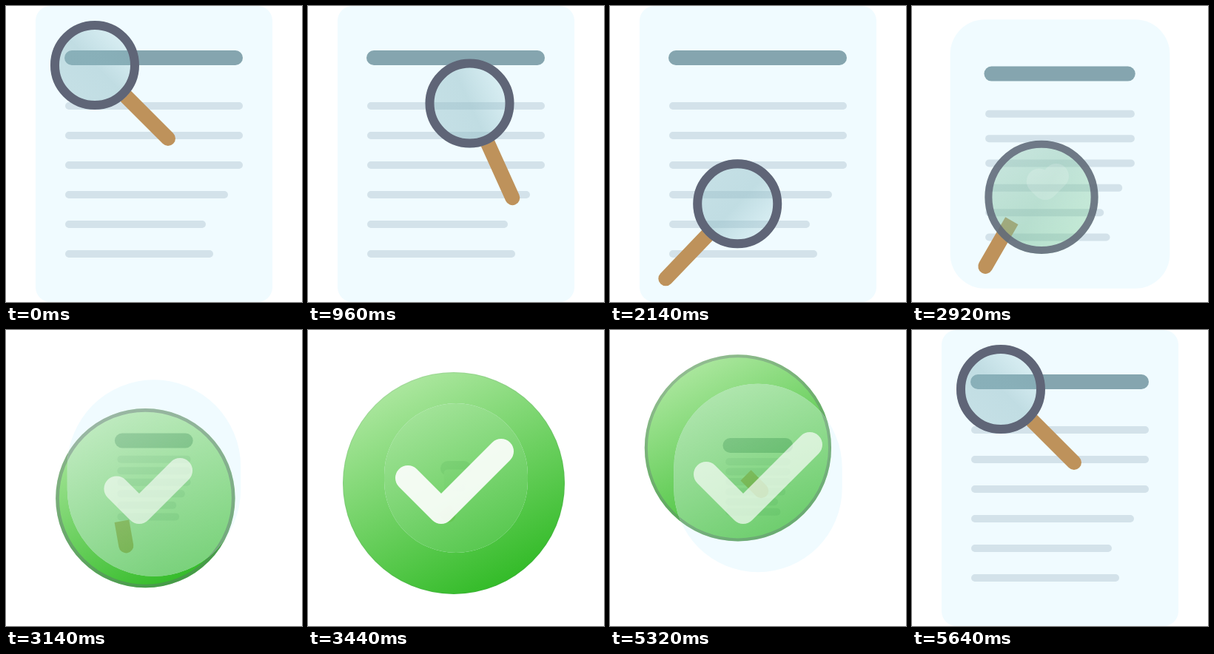
These frames come from a looping animation (400x400 px, 5740 ms). An HTML page with a canvas:

```html
<!DOCTYPE html>
<html lang="en">
<head>
<meta charset="utf-8">
<title>Document check</title>
<style>
  html, body { margin: 0; width: 100%; height: 100%; overflow: hidden; background: #fff; }
  canvas { display: block; width: 100%; height: 100%; }
</style>
</head>
<body>
<canvas id="stage" width="400" height="400"></canvas>
<script>
const ctx = document.getElementById('stage').getContext('2d');
const LOOP = 5740, STEP = 20;
const LINES = [[135, 320], [175, 320], [215, 320], [255, 300], [295, 270], [335, 280]]; // y, right end

const mix = (a, b, p) => Array.isArray(a) ? a.map((v, i) => mix(v, b[i], p)) : a + (b - a) * p;

// cubic-bezier(.5, 0, .5, 1)
function easeInOut(x) {
  if (x <= 0) return 0;
  if (x >= 1) return 1;
  let lo = 0, hi = 1;
  for (let i = 0; i < 24; i++) {
    const u = (lo + hi) / 2;
    if (1.5 * u * (1 - u) + u ** 3 < x) lo = u; else hi = u;
  }
  return lo * lo * (3 - 2 * lo);
}
const tween = (t, start) => t >= start + 580 ? 1 : easeInOut((t - start - 10) / 600);

// Critically damped spring
function spring(t, start, end) {
  if (t <= start) return 0;
  if (t >= end) return 1;
  const k = 6.08 * (t - start) / 1000;
  return 1 - (1 + k) * Math.exp(-k);
}

// Magnifier pose: group centre and handle direction in degrees
const SPOTS = [[151.8, 111.8, 45], [280.7, 203.7, 76.2], [138.2, 301.8, 135]];
function lens([x, y, deg]) {
  const a = deg * Math.PI / 180, dx = Math.cos(a), dy = Math.sin(a);
  return { glass: [x - 45 * dx, y - 45 * dy], handle: [x + 57.5 * dx, y + 57.5 * dy], deg };
}

function sceneAt(t) {
  let pose, done;
  if (t < 5060) {
    pose = lens(t < 1600 ? mix(SPOTS[0], SPOTS[1], tween(t, 600))
                         : mix(SPOTS[1], SPOTS[2], tween(t, 1600)));
    done = spring(t, 2800, 4080);
  } else {
    pose = lens(SPOTS[0]);
    done = 1 - tween(t, 5060);
  }
  return {
    done,
    grow: t < 5060 ? done : 1,
    glass: mix(pose.glass, [200, 200], done),
    handle: mix(pose.handle, [200, 240], done),
    angle: mix(pose.deg, 45, done) * Math.PI / 180
  };
}

function bar(left, right, y, h, color, done) {
  left = mix(left, 200 - h / 2, done);
  right = mix(right, 200 + h / 2, done);
  ctx.fillStyle = color;
  ctx.beginPath();
  ctx.roundRect(left, mix(y, 200, done) - h / 2, right - left, h, h / 2);
  ctx.fill();
}

function docPath(done) {
  const w = mix(320, 180, done), h = mix(400, 180, done);
  ctx.beginPath();
  ctx.roundRect(200 - w / 2, 200 - h / 2, w, h, mix(20, 180, done));
}

function drawHandle({ handle, angle, done }) {
  const len = mix(95, 11, done);
  ctx.save();
  ctx.translate(...handle);
  ctx.rotate(angle);
  ctx.fillStyle = '#be925b';
  ctx.beginPath();
  ctx.roundRect(-len / 2, -10, len, 20, [0, 10, 10, 0]);
  ctx.fill();
  ctx.restore();
}

function drawDisc({ glass: [x, y], angle, done }, solid) {
  const r = mix(60, 160, done), border = 12 * (1 - done);
  const disc = (fill, alpha) => {
    ctx.globalAlpha = alpha;
    ctx.fillStyle = fill;
    ctx.beginPath();
    ctx.arc(x, y, r, 0, 7);
    ctx.fill();
  };
  const gradient = (dx, dy, stops) => {
    const g = ctx.createLinearGradient(x - dx * r, y - dy * r, x + dx * r, y + dy * r);
    stops.forEach((c, i) => g.addColorStop(i / (stops.length - 1), c));
    return g;
  };
  if (!solid) {
    disc(gradient(Math.sin(angle), -Math.cos(angle),
      ['rgba(141,188,196,.43)', 'rgba(141,188,196,.48)', 'rgba(141,196,204,.2)']), 1 - done);
  }
  disc(gradient(.45, .87, ['#a9e69c', '#35bc2a']), solid ? 1 : done);
  if (border > 0) {
    ctx.globalAlpha = 1 - done;
    ctx.strokeStyle = '#5f6577';
    ctx.lineWidth = border;
    ctx.beginPath();
    ctx.arc(x, y, r - border / 2, 0, 7);
    ctx.stroke();
  }
  ctx.globalAlpha = 1;
}

function drawCheck({ done, grow }) {
  ctx.globalAlpha = done;
  ctx.strokeStyle = '#fff';
  ctx.lineWidth = 34;
  ctx.lineCap = ctx.lineJoin = 'round';
  ctx.beginPath();
  ctx.moveTo(180 - 50 * grow, 245 - 50 * grow);
  ctx.lineTo(180, 245);
  ctx.lineTo(180 + 90 * grow, 245 - 90 * grow);
  ctx.stroke();
  ctx.globalAlpha = 1;
}

function draw(t) {
  const scene = sceneAt(t), { done } = scene;
  ctx.clearRect(0, 0, 400, 400);

  // The disc is solid off the page and translucent over it
  if (done > 0) drawDisc(scene, true);
  docPath(done);
  ctx.fillStyle = '#f0fbff';
  ctx.fill();
  bar(79, 320, 70, 20, '#85a5af', done);
  for (const [y, right] of LINES) bar(80, right, y, 10, '#d3e2ea', done);
  drawHandle(scene);

  ctx.save();
  docPath(done);
  ctx.clip();
  drawDisc(scene, false);
  ctx.restore();
  if (done > 0) drawCheck(scene);
}

function tick() {
  const t = performance.now() % LOOP;
  draw(Math.floor(t / STEP) * STEP);
  requestAnimationFrame(tick);
}
tick();
</script>
</body>
</html>
```
